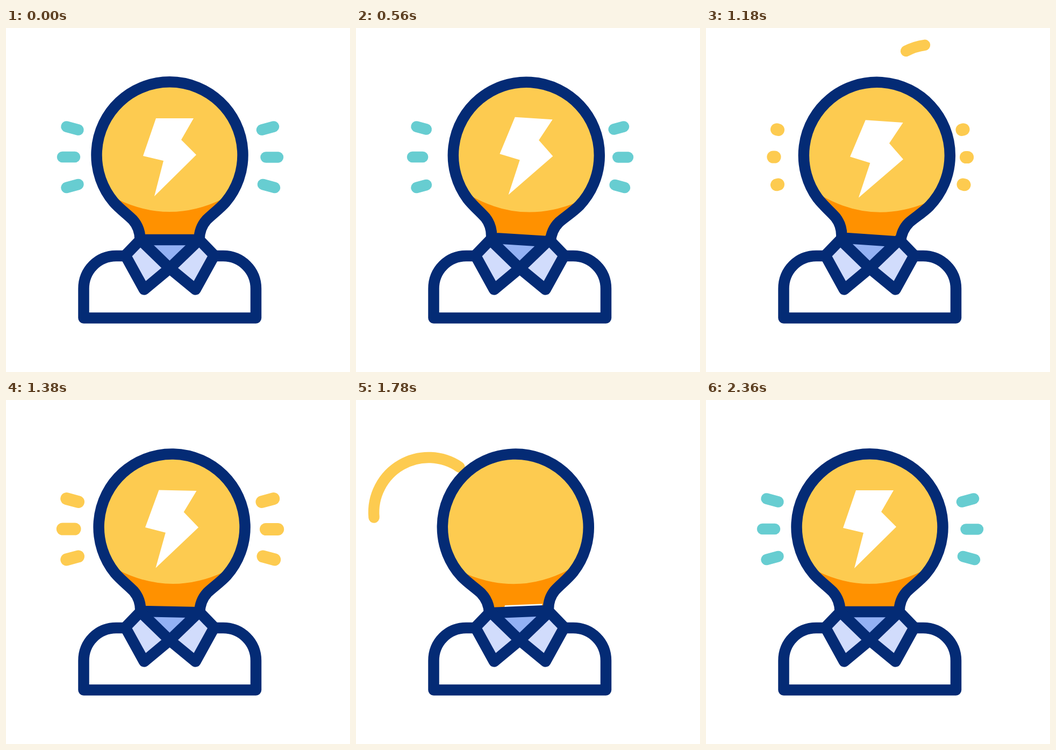
An HTML page that plays this animation: 640x640 px, repeating every 3.22 s.

```html
<!DOCTYPE html>
<html lang="en">
<head>
<meta charset="utf-8">
<title>Bright idea</title>
<style>
  html, body { margin: 0; width: 100%; height: 100%; overflow: hidden; background: #fff; }
  svg { display: block; width: 100vw; height: 100vh; }
  .line { stroke: #042b75; stroke-width: 20.5; stroke-linejoin: round; stroke-linecap: round; }
  .swoosh, .ray { fill: none; stroke-width: 20.5; stroke-linecap: round; }
  .swoosh { stroke: #fdcb50; }
</style>
</head>
<body>
<svg viewBox="0 0 640 640">
  <defs>
    <path id="bulb" d="M249.5 394C249.5 378 244 366 236 357C225 346 212 337 200.500 324A136 136 0 1 1 408.500 324C397 337 384 346 373 357C365 366 359.500 378 359.500 394Z"/>
    <clipPath id="inside"><use href="#bulb"/></clipPath>
  </defs>

  <path class="swoosh" id="right" pathLength="100" d="M519.100 157A102 102 0 0 0 372.100 42.900"/>
  <path class="swoosh" id="left" pathLength="100" d="M33.500 218.500A102 102 0 0 1 195 126.500"/>
  <g id="rays"></g>

  <path class="line" fill="#fff" d="M217 424H205C171 424 144.500 451 144.500 485V539.500H465V485C465 451 438 424 404 424H392"/>
  <path fill="#93b1f4" d="M249.500 390H359.500V394L304.500 447L249.500 394Z"/>

  <g id="head">
    <use href="#bulb" fill="#fdcb50"/>
    <g clip-path="url(#inside)">
      <path fill="#ff9100" d="M180 300L206 318Q304.500 366 403 318L430 300V420H180Z"/>
      <path id="bolt" fill="#fff" d="M279 168H349L326 208L354 236L276 313L293 247L255 238Z"/>
    </g>
    <use href="#bulb" class="line" fill="none"/>
  </g>

  <path class="line" fill="#d1dcfc" d="M250 394L222 423L257 486.500L304.500 447Z"/>
  <path class="line" fill="#d1dcfc" d="M359.500 394L387.500 423L352.500 486.500L304.500 447Z"/>
</svg>

<script>
const LOOP = 3220;
const $ = id => document.getElementById(id);

// Each key is [time, value]; values ease in and out between keys.
const tilt = [[260, 0], [490, 4.4], [880, -4.4], [1230, 4.4], [1600, -4.4], [1970, 0]];
const drop = [
  [535, 0], [660, -10], [840, 220], [840, -215], [920, -215], [1150, 5], [1300, 0],
  [1490, 0], [1620, -10], [1800, 220], [1800, -215], [1940, -215], [2210, 5], [2360, 0]
];

// Rays from the inner end to the outer end.
const rayPaths = [
  "M134.5 189.5L112.5 183.5", "M128 240H105", "M134.5 291L112.5 297",
  "M476 189.5L498 183.5", "M483.5 240.5H506", "M478 291L500 297"
];
$("rays").innerHTML = rayPaths
  .map(d => `<path class="ray" pathLength="100" d="${d}"/>`).join("");
const rays = [...document.querySelectorAll(".ray")];

function ease(t, start, end) {
  const u = Math.min(1, Math.max(0, (t - start) / (end - start)));
  return u * u * (3 - 2 * u);
}

function valueAt(keys, t) {
  const next = keys.findIndex(k => k[0] > t);
  if (next === 0) return keys[0][1];
  if (next < 0) return keys[keys.length - 1][1];
  const [t0, a] = keys[next - 1], [t1, b] = keys[next];
  return a + (b - a) * ease(t, t0, t1);
}

// Show only the stretch of a path between two fractions.
function trim(path, from, to) {
  path.style.display = to - from > 0.001 ? "" : "none";
  path.style.strokeDasharray = `${(to - from) * 100} 300`;
  path.style.strokeDashoffset = -from * 100;
}

function draw(t) {
  $("head").setAttribute("transform", `rotate(${valueAt(tilt, t)} 304.5 431)`);
  $("bolt").setAttribute("transform", `translate(0 ${valueAt(drop, t)})`);

  trim($("right"), ease(t, 990, 1245), ease(t, 668, 1003));
  trim($("left"), ease(t, 1800, 2055), ease(t, 1469, 1804));

  const yellow = t > 1000 && t < 1800;
  let from = 0, to = 1;
  if (yellow) {
    from = ease(t, 1390, 1710);
    to = ease(t, 1114, 1400);
  } else if (t <= 1000) {
    from = ease(t, 470, 820);
  } else {
    to = ease(t, 1874, 2254);
  }
  for (const ray of rays) {
    ray.style.stroke = yellow ? "#fdcb50" : "#67cdd1";
    ray.style.strokeWidth = yellow ? 23 : 20.5;
    trim(ray, from, to);
  }
}

const begin = performance.now();
function tick() {
  draw((performance.now() - begin) % LOOP);
  requestAnimationFrame(tick);
}
tick();
</script>
</body>
</html>
```
